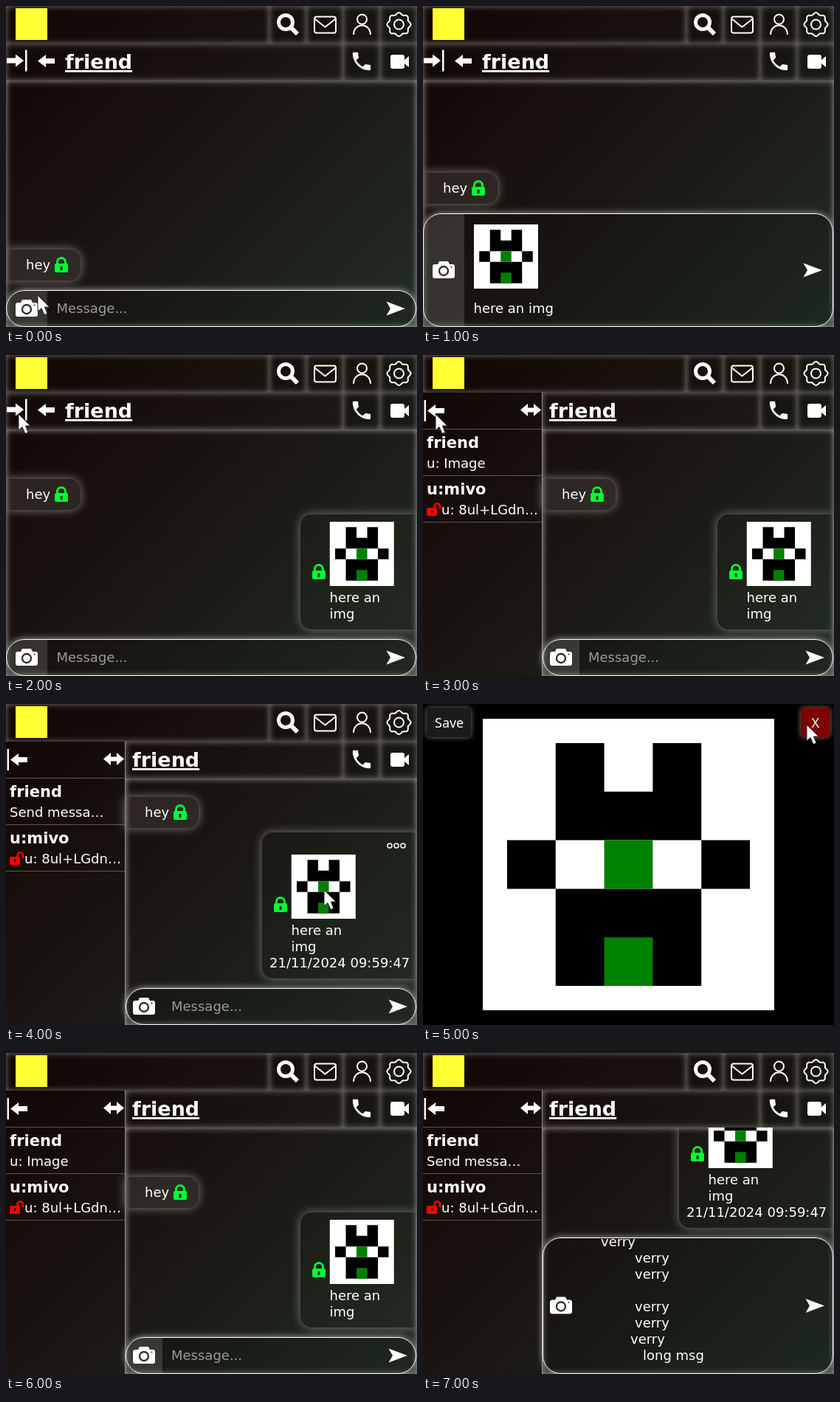
An HTML page that plays this animation: 557 px wide and 435 px high, repeating every 8 s.

```html
<!DOCTYPE html>
<html lang="en">
<head>
<meta charset="utf-8">
<title>Chat</title>
<style>
  html, body { margin: 0; width: 100%; height: 100%; overflow: hidden; background: #000; }
  #stage, .layer { position: absolute; left: 0; top: 0; width: 557px; height: 435px; overflow: hidden; }
  .wall { background: linear-gradient(135deg, #110604, #1b1712 50%, #212e24); }
  .box { position: absolute; box-sizing: border-box; }
  .bar { box-shadow: inset 0 0 8px #777672; }
  .button { box-shadow: inset 0 0 8px #777672; background: rgba(0, 0, 0, .15); }
  .pane { box-shadow: inset 0 0 8px #aaa; }
  .rule { background: #5c5854; }
  .divider { background: #8c8a88; }
  .theirs { border-radius: 0 15px 15px 0; background: rgba(255, 255, 255, .09); box-shadow: 0 0 13px #83817e; }
  .mine { border-radius: 15px 0 0 15px; box-shadow: 0 0 13px #777a75; }
  .input { border: 1px solid #fff; border-radius: 25px; overflow: hidden; background: rgba(0, 0, 0, .12); box-shadow: 0 0 10px #aaa; }
  .hot { background: rgba(255, 255, 255, .14); }
  .save { border-radius: 5px; background: #1b1b1b; box-shadow: 0 0 7px #777; }
  .close { border-radius: 5px; background: #800000; box-shadow: 0 0 7px #777; }
  svg { position: absolute; left: 0; top: 0; fill: #fff; }
  text { font: 18px "DejaVu Sans", sans-serif; }
  .title { font-size: 27px; font-weight: bold; text-decoration: underline 1.5px; text-underline-offset: 1.5px; }
  .name { font-size: 21px; font-weight: bold; }
  .hint { fill: #999; }
  .label { font-family: "Noto Sans", sans-serif; }
  .line { fill: none; stroke: #fff; stroke-width: 2; }
</style>
</head>
<body>
<div id="stage"></div>
<script>
const box = (x, y, w, h, kind, inner = "") =>
  `<div class="box ${kind}" style="left:${x}px;top:${y}px;width:${w}px;height:${h}px">${inner}</div>`;
const layer = (inner, clipTop = 0) =>
  `<div class="layer" style="clip-path:inset(${clipTop}px 0 0)">${inner}</div>`;
const draw = inner => `<svg width="557" height="435">${inner}</svg>`;
const at = (x, y, inner, scale = 1) => `<g transform="translate(${x} ${y}) scale(${scale})">${inner}</g>`;
const text = (x, y, words, kind = "") => `<text x="${x}" y="${y}" class="${kind}">${words}</text>`;
const path = (d, extra = "") => `<path d="${d}" ${extra}/>`;

const gearPath = "M" + Array.from({ length: 96 }, (_, i) => {
  const a = i * Math.PI / 48, r = 14.8 + 1.3 * Math.cos(8 * a);
  return `${(r * Math.cos(a)).toFixed(1)} ${(r * Math.sin(a)).toFixed(1)}`;
}).join("L") + "Z";

const icons = {
  search: `<g class="line"><circle cx="-3" cy="-3" r="9.5" style="stroke-width:5"/>
    <path d="M4 4L13 13" style="stroke-width:6"/></g>`,
  mail: `<g class="line"><rect x="-14.5" y="-11" width="29" height="22" rx="3"/>
    <path d="M-14-8L0 3L14-8"/></g>`,
  person: `<g class="line"><circle cy="-7" r="6.5"/><path d="M-11.5 14C-11.5-3 11.5-3 11.5 14"/></g>`,
  gear: `<g class="line">${path(gearPath)}<circle r="6.5"/></g>`,
  phone: path("M6.6 10.8c1.4 2.8 3.8 5.1 6.6 6.6l2.2-2.2c.3-.3.7-.4 1-.2 1.1.4 2.3.6 3.6.6.6 0 1 .4 1 1V20c0 .6-.4 1-1 1C10.6 21 3 13.4 3 4c0-.6.4-1 1-1h3.5c.6 0 1 .4 1 1 0 1.2.2 2.4.6 3.6.1.3 0 .7-.3 1z",
    'transform="scale(1.35) translate(-12 -12)"'),
  video: `<rect x="-12" y="-9" width="19" height="19" rx="3"/>` + path("M6-1L13-7V8L6 2Z"),
  arrow: path("M0 0L11-8.5V-3.5H23V3.5H11V8.5Z"),
  both: path("M-14 0L-4-8.5V-3H4V-8.5L14 0L4 8.5V3H-4V8.5Z"),
  lock: `<g fill="#00ff33"><rect x="-9" y="-2" width="18" height="12" rx="2"/>
    <path d="M-5.5-1V-4a5.5 5.5 0 0 1 11 0V-1" fill="none" stroke="#00ff33" stroke-width="3"/></g>
    <path d="M-1.5 2h3v5h-3z" fill="#1d261d"/>`,
  unlocked: `<g fill="#f00"><rect x="-9.5" y="-2" width="14" height="11" rx="1.5"/>
    <path d="M1-2V-4a3.7 3.7 0 0 1 7.5 0V0" fill="none" stroke="#f00" stroke-width="2.5"/></g>
    <path d="M-3.5 1h2v4h-2z" fill="#160d0a"/>`,
  camera: path("M-12-8H-8L-6-12H6L8-8H12Q15-8 15-5V8Q15 11 12 11H-12Q-15 11-15 8V-5Q-15-8-12-8Z") +
    `<circle cy="1" r="6" fill="none" stroke="#2d2c29" stroke-width="2.3"/><circle cx="10.5" cy="-4.5" r="1" fill="#2d2c29"/>`,
  send: path("M-12.5-9.5L13 0L-12.5 9.5L-7 0Z"),
  pointer: path("M0 0V22L5 17.5L9 26.5L13 25L9.5 16H16Z", 'stroke="#222"')
};

// Square picture drawn on a 12 x 12 grid.
const picture = (x, y, size) => at(x, y, path("M0 0h12v12h-12z") +
  path("M3 1h2v2h2v-2h2v4h-6zM1 5h2v2h-2zM9 5h2v2h-2zM3 7h6v4h-6z", 'fill="#000"') +
  path("M5 5h2v2h-2zM5 9h2v2h-2z", 'fill="#008000"'), size / 12);

const topBar = box(0, 0, 357, 51, "bar") +
  [357, 407, 457, 507].map(x => box(x, 0, 50, 51, "button")).join("") +
  draw(`<rect x="13" y="3" width="43" height="43" fill="#ffff33"/>` +
    at(382, 25, icons.search) + at(432.5, 25.5, icons.mail) +
    at(482.5, 25, icons.person) + at(532.5, 25, icons.gear));

const chatBar = (left, side) => box(left, 51, 457 - left, 50, "bar") +
  [457, 507].map(x => box(x, 51, 50, 50, "button")).join("") +
  draw(text(side ? 171 : 80, 85, "friend", "title") +
    at(482, 75, icons.phone) + at(533, 75, icons.video) +
    (side
      ? path("M1.5 61h2.5v29h-2.5z") + at(6, 75.5, icons.arrow) + at(146, 74.5, icons.both)
      : at(24, 74, `<g transform="scale(-1 1)">${icons.arrow}</g>`) +
        path("M26 59.5h2.5v29h-2.5z") + at(43, 74.5, icons.arrow)));

const sidebar = preview => [100, 163, 226].map(y => box(0, y, 161, 1, "rule")).join("") +
  box(161, 50, 1, 385, "divider") +
  draw(text(5, 126, "friend", "name") + text(5, 153, preview) +
    text(5, 189, "u:mivo", "name") + at(14.5, 209, icons.unlocked) + text(25, 216, "u: 8ul+LGdn…"));

const greeting = (left, y) => box(left, y, left ? 99 : 101, 42, "theirs") +
  draw(text(left ? 188 : 27, y + 27, "hey") + at(left ? 236 : 75, y + 21, icons.lock));

function photoMessage(y, details) {
  const x = details ? 347 : 399, top = y + (details ? 30 : 10);
  let marks = picture(x + 39.8, top, 87) + at(x + 25, top + 68, icons.lock) +
    text(x + 39.5, top + 109, "here an") + text(x + 39.5, top + 131, "img");
  if (details) {
    marks += text(x + 10, top + 153, "21/11/2024 09:59:47") +
      [520, 529, 538].map(cx => `<circle cx="${cx}" cy="${y + 18}" r="3" class="line" style="stroke-width:1.5"/>`).join("");
  }
  return box(x, y, 555 - x, details ? 198 : 156, "mine") + draw(marks);
}

function composer(left, top, hot, content) {
  const mid = (top + 435) / 2;
  const glow = hot ? box(0, 0, left ? 49 : 55, 433 - top, "hot") : "";
  return box(left, top, 556 - left, 435 - top, "input", glow) +
    draw(at(left ? 187 : 28, mid, icons.camera) + at(left ? 531 : 528, mid, icons.send)) +
    layer(draw(content), top + 1);
}

function chat({ preview, hey, photo, details, top = 385, hot, content, pointer }) {
  const side = !!preview, left = side ? 162 : 0;
  const messages = (hey === undefined ? "" : greeting(left, hey)) +
    (photo === undefined ? "" : photoMessage(photo, details));
  return `<div class="layer wall">` + topBar + (side ? sidebar(preview) : "") + chatBar(left, side) +
    box(left, 101, 557 - left, 334, "pane") + layer(messages, 101) +
    composer(left, top, hot, content || text(left ? 224 : 68.5, 416, "Message...", "hint")) +
    (pointer ? draw(at(...pointer, icons.pointer)) : "") + `</div>`;
}

const viewer = box(5, 5, 60, 40, "save") + box(512, 5, 40, 40, "close") +
  draw(picture(81, 20, 395) + text(16, 32, "Save", "label") + text(526.5, 32, "X", "label") +
    at(520, 28, icons.pointer));

const longMessage = [[241, 262], [287, 284], [287, 306], [287, 350], [287, 372], [281, 394]]
  .map(([x, y]) => text(x, y, "verry")).join("") + text(298, 416, "long msg");

const scenes = [
  chat({ hey: 330, hot: true, pointer: [43, 392] }),
  chat({ hey: 226, top: 281, hot: true, content: picture(69, 296, 87) + text(68.5, 416, "here an img") }),
  chat({ hey: 168, photo: 216, hot: true, pointer: [17, 80] }),
  chat({ preview: "u: Image", hey: 168, photo: 216, hot: true, pointer: [17, 80] }),
  chat({ preview: "Send messa…", hey: 126, photo: 174, details: true, pointer: [431, 252] }),
  viewer,
  chat({ preview: "u: Image", hey: 168, photo: 216, hot: true }),
  chat({ preview: "Send messa…", photo: 39, details: true, top: 250, content: longMessage })
];

const stage = document.getElementById("stage");
let shown = -1;
function tick() {
  const scene = Math.floor(performance.now() / 1000) % scenes.length;
  if (scene !== shown) stage.innerHTML = scenes[shown = scene];
  requestAnimationFrame(tick);
}
tick();
</script>
</body>
</html>
```
